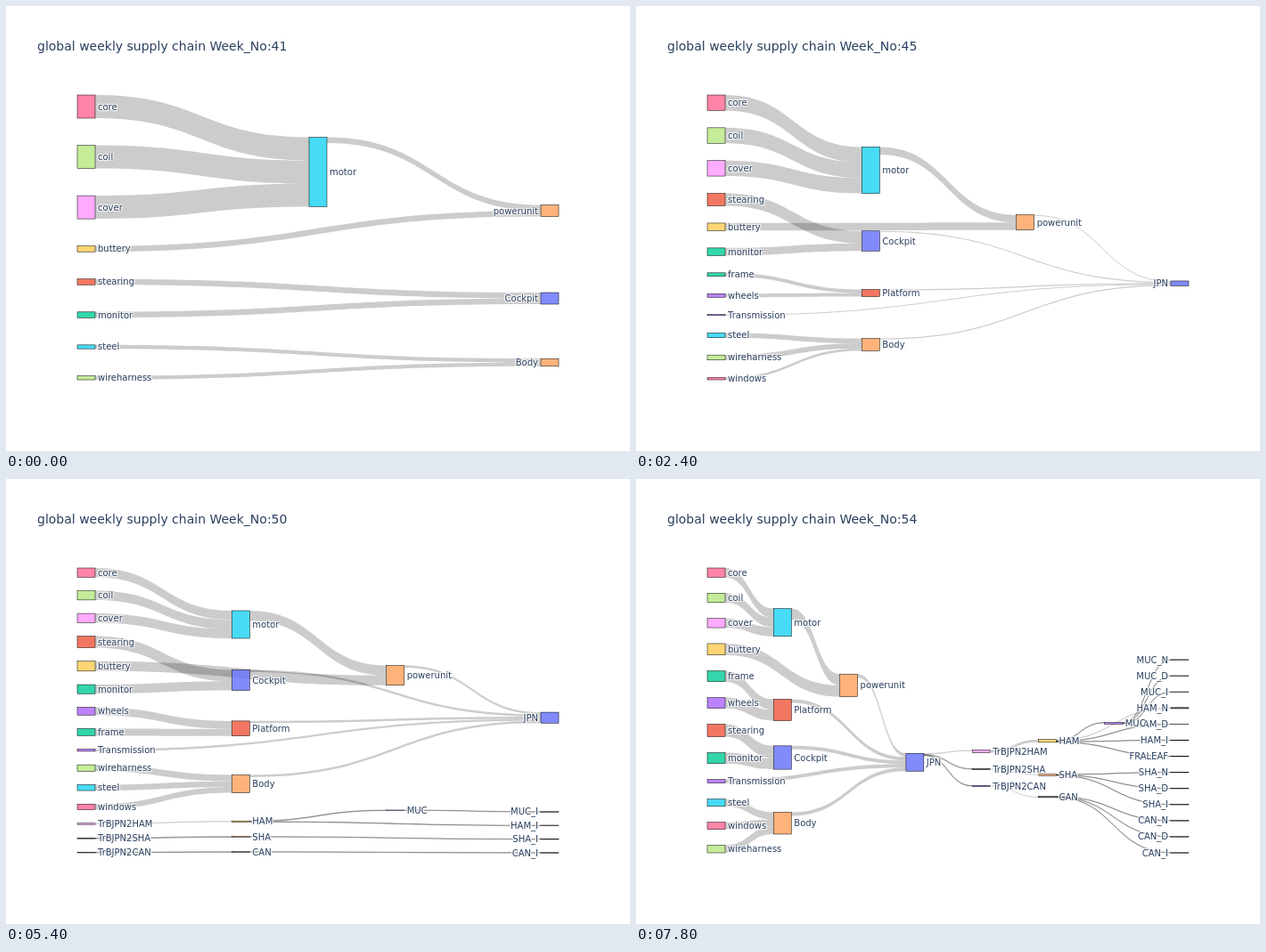
An HTML page that plays this animation: 700 by 500 pixels, repeating every 8000 ms.

```html
<!DOCTYPE html>
<html lang="en">
<head>
<meta charset="utf-8">
<title>Weekly supply chain</title>
<style>
html, body { margin: 0; width: 100%; height: 100%; overflow: hidden; background: #fff; }
svg { display: block; }
text { font: 10px "DejaVu Sans", sans-serif; fill: #2a3f5f; }
.title { font-size: 14px; }
.label { text-shadow: 1px 1px 1px #fff, 1px -1px 1px #fff, -1px 1px 1px #fff, -1px -1px 1px #fff; }
.link { fill: #000; fill-opacity: .2; }
.thin { stroke: #000; stroke-opacity: .27; }
.node { fill-opacity: .8; stroke: #000; stroke-width: .5; }
</style>
</head>
<body>
<svg id="stage" width="700" height="500" viewBox="0 0 700 500"></svg>
<script>
const TOP = 100, BOTTOM = 420, LEFT = 80, SPAN = 520, NODE = 20;

// left: name and size; mid: name, column, centre, outgoing sizes; ends: names
const weeks = {
  41: { columns: 3,
    left: 'core 26,coil 26,cover 26,buttery 6.5,stearing 6.5,monitor 6.5,steel 4.3,wireharness 4.3',
    mid: 'motor 1 186.5 6.5,powerunit 2 230 0,Cockpit 2 328.5 0,Body 2 400.5 0' },
  43: { columns: 4,
    left: 'core 19.3,coil 19.3,cover 19.3,stearing 13.7,buttery 9.4,monitor 9.2,steel 6.3,wireharness 6.3,Transmission .5,windows 1.1,frame 1.5,wheels 1.5',
    mid: 'motor 1 189.5 9.2,powerunit 2 249.8 .6,Cockpit 1 272.4 .6,Body 1 335.6 .6,Platform 1 395.8 .6,JPN 3 322 0' },
  45: { columns: 4,
    left: 'core 17.4,coil 17.4,cover 17.4,stearing 14,buttery 8.5,monitor 8.5,frame 4,wheels 4,Transmission 1.1,steel 5.5,wireharness 5.6,windows 2.8',
    mid: 'motor 1 184.5 8.5,powerunit 2 243.2 1.1,Cockpit 1 264 1.1,Platform 1 322.5 1.1,Body 1 380.5 1.1,JPN 3 311.7 0' },
  47: { columns: 4,
    left: 'core 13.4,coil 13.4,cover 13.4,buttery 11.8,stearing 12,monitor 11.8,frame 6.5,wheels 6.5,Transmission 1.5,steel 6.2,wireharness 6.2,windows 5,TrBJPN2HAM .7',
    mid: 'motor 1 173.4 11.6,powerunit 2 217 1.5,Cockpit 1 258 1.5,Platform 1 305 1.5,Body 1 364.4 1.5,JPN 3 295 0,HAM 1 419.8 .7,MUC 3 419.8 0' },
  49: { columns: 4,
    left: 'core 10.9,coil 10.9,cover 10.9,stearing 13.8,buttery 11.5,monitor 9.4,wheels 8.8,frame 7.2,Transmission 2.2,wireharness 7.6,steel 6.3,windows 6.3,TrBJPN2HAM 1,TrBJPN2SHA .6,TrBJPN2CAN .6',
    mid: 'motor 1 163.5 11.5,powerunit 2 210.5 2.3,Cockpit 1 226 2.3,Platform 1 280.3 2.3,Body 1 337.6 2.3,JPN 3 266.7 0,HAM 1 386.5 .5,SHA 1 404.6 .6,CAN 1 419.8 .6,MUC 2 382.8 .5',
    ends: 'MUC_I HAM_I SHA_I CAN_I' },
  51: { columns: 4,
    left: 'frame 8.8,wheels 8.8,core 9.8,coil 9.8,cover 9.8,buttery 10.8,stearing 12,monitor 11,Transmission 2.5,steel 6.8,wireharness 6.8,windows 6.4,TrBJPN2HAM 1.8,TrBJPN2SHA 1,TrBJPN2CAN .7',
    mid: 'motor 1 219.3 10.8,powerunit 2 230.7 2.6,Platform 1 180.3 2.6,Cockpit 1 286.2 2.6,Body 1 347.5 2.6,JPN 3 269.6 0,HAM 1 383.2 .8/.4,SHA 1 399.6 .5,CAN 1 418.3 .4,MUC 2 361.8 .4',
    ends: 'MUC_D MUC_I HAM_D HAM_I FRALEAF SHA_D SHA_I CAN_D CAN_I' },
  54: { columns: 8,
    left: 'core 10.4,coil 10.4,cover 10.4,buttery 12.8,frame 12,wheels 12,stearing 14,monitor 12.3,Transmission 4,steel 8.2,windows 8,wireharness 8.4',
    mid: 'motor 1 161.2 12.6,powerunit 2 231.9 4,Platform 1 259.5 4,Cockpit 1 313 4,Body 1 386.7 4,JPN 3 318.2 1.2/.7,TrBJPN2HAM 4 306 3,TrBJPN2SHA 4 326 1.2,TrBJPN2CAN 4 345 1.2,HAM 5 294.3 1.2/.5,SHA 5 332.5 .5,CAN 5 357.3 .4,MUC 6 274.5 .6',
    ends: 'MUC_N MUC_D MUC_I HAM_N HAM_D HAM_I FRALEAF SHA_N SHA_D SHA_I CAN_N CAN_D CAN_I' }
};

// weeks drawn halfway from one layout towards another
const between = { 42: [41, 43], 44: [45, 43], 46: [45, 47], 48: [47, 49], 50: [49, 51], 52: [51, 54], 53: [54, 51] };

const sources = {
  motor: 'core coil cover', powerunit: 'motor buttery', Cockpit: 'stearing monitor',
  Body: 'steel wireharness windows', Platform: 'frame wheels',
  JPN: 'powerunit Cockpit Platform Body Transmission',
  HAM: 'TrBJPN2HAM', SHA: 'TrBJPN2SHA', CAN: 'TrBJPN2CAN', MUC: 'HAM', FRALEAF: 'HAM',
  TrBJPN2HAM: 'JPN', TrBJPN2SHA: 'JPN', TrBJPN2CAN: 'JPN'
};

const palette = {
  '#636efa': 'Cockpit JPN TrBJPN2CAN', '#ef553b': 'stearing Platform', '#00cc96': 'monitor frame',
  '#ab63fa': 'wheels Transmission MUC', '#ffa15a': 'powerunit Body SHA', '#19d3f3': 'motor steel',
  '#ff6692': 'core windows', '#b6e880': 'coil wireharness', '#ff97ff': 'cover TrBJPN2HAM', '#fecb52': 'buttery HAM'
};
const colours = {};
for (const [colour, names] of Object.entries(palette))
  for (const name of names.split(' ')) colours[name] = colour;

const sum = list => list.reduce((a, b) => a + b, 0);

function readNodes({ columns, left, mid, ends }) {
  const nodes = {};
  const add = (name, column, y, out) => { nodes[name] = { name, column, y, out, enter: [], leave: [] }; };
  for (const item of left.split(',')) {
    const [name, size] = item.split(' ');
    add(name, 0, 0, [+size]);
  }
  for (const item of mid.split(',')) {
    const [name, column, y, out] = item.split(' ');
    add(name, +column, +y, out.split('/').map(Number));
  }
  if (ends) for (const name of ends.split(' ')) add(name, columns - 1, 0, [0]);
  return nodes;
}

function layout(week) {
  const [base, other] = between[week] || [week];
  const spec = weeks[base], nodes = readNodes(spec), list = Object.values(nodes);
  if (other) {
    const near = readNodes(weeks[other]);
    for (const node of list) {
      const twin = near[node.name];
      if (!twin || twin.column !== node.column) continue;
      node.out = node.out.map((w, i) => w && (w + (twin.out[i] || w)) / 2);
      if (Math.abs(twin.y - node.y) < 25) node.y = (node.y + twin.y) / 2;
    }
  }

  const first = list.filter(n => n.column === 0);
  const gap = (BOTTOM - TOP - sum(first.map(n => n.out[0]))) / (first.length - 1);
  let y = TOP;
  for (const node of first) {
    node.y = y + node.out[0] / 2;
    y += node.out[0] + gap;
  }
  const ends = spec.ends ? spec.ends.split(' ') : [];
  ends.forEach((name, i) => { nodes[name].y = BOTTOM - (gap + .15) * (ends.length - 1 - i); });

  for (const to of list)
    for (const name of (sources[to.name] || to.name.split('_')[0]).split(' ')) {
      const from = nodes[name];
      if (!from || from.column >= to.column) continue;
      const link = { from, to };
      from.leave.push(link);
      to.enter.push(link);
    }
  for (const node of list) {
    node.leave.sort((a, b) => a.to.y - b.to.y);
    node.leave.forEach((link, i) => { link.width = node.out[i] ?? node.out.at(-1); });
    node.enter.sort((a, b) => a.from.y - b.from.y);
  }
  for (const node of list) {
    const size = links => sum(links.map(l => l.width));
    node.height = Math.max(size(node.enter), size(node.leave));
    node.top = node.y - node.height / 2;
    node.x = LEFT + SPAN * node.column / (spec.columns - 1);
    node.last = node.column === spec.columns - 1;
    let start = node.top, end = node.top;
    for (const link of node.leave) { link.y0 = start; start += link.width; }
    for (const link of node.enter) { link.y1 = end; end += link.width; }
  }
  return list.sort((a, b) => b.last - a.last);
}

function drawLink({ from, to, width, y0, y1 }) {
  const x0 = from.x + NODE, x1 = to.x, mid = (x0 + x1) / 2;
  return `<path class="link${width > 1 ? '' : ' thin'}" d="M${x0} ${y0}C${mid} ${y0} ${mid} ${y1} ${x1} ${y1}` +
    `v${width}C${mid} ${y1 + width} ${mid} ${y0 + width} ${x0} ${y0 + width}Z"/>`;
}

function drawNode({ name, x, top, height }) {
  return `<rect class="node" fill="${colours[name] || '#444'}" x="${x}" y="${top}" width="${NODE}" height="${Math.max(height, .5)}"/>`;
}

function drawLabel({ name, x, y, last }) {
  return `<text class="label" x="${last ? x - 3 : x + NODE + 3}" y="${y + 3.5}"` +
    `${last ? ' text-anchor="end"' : ''}>${name}</text>`;
}

const stage = document.getElementById('stage');
let shown;
function frame() {
  const week = 41 + Math.floor(performance.now() % 8000 / 600);
  if (week !== shown) {
    shown = week;
    const nodes = layout(week);
    stage.innerHTML = `<text class="title" x="35" y="50">global weekly supply chain Week_No:${week}</text>` +
      nodes.flatMap(n => n.leave).map(drawLink).join('') +
      nodes.map(drawNode).join('') + nodes.map(drawLabel).join('');
  }
  requestAnimationFrame(frame);
}
frame();
</script>
</body>
</html>
```
